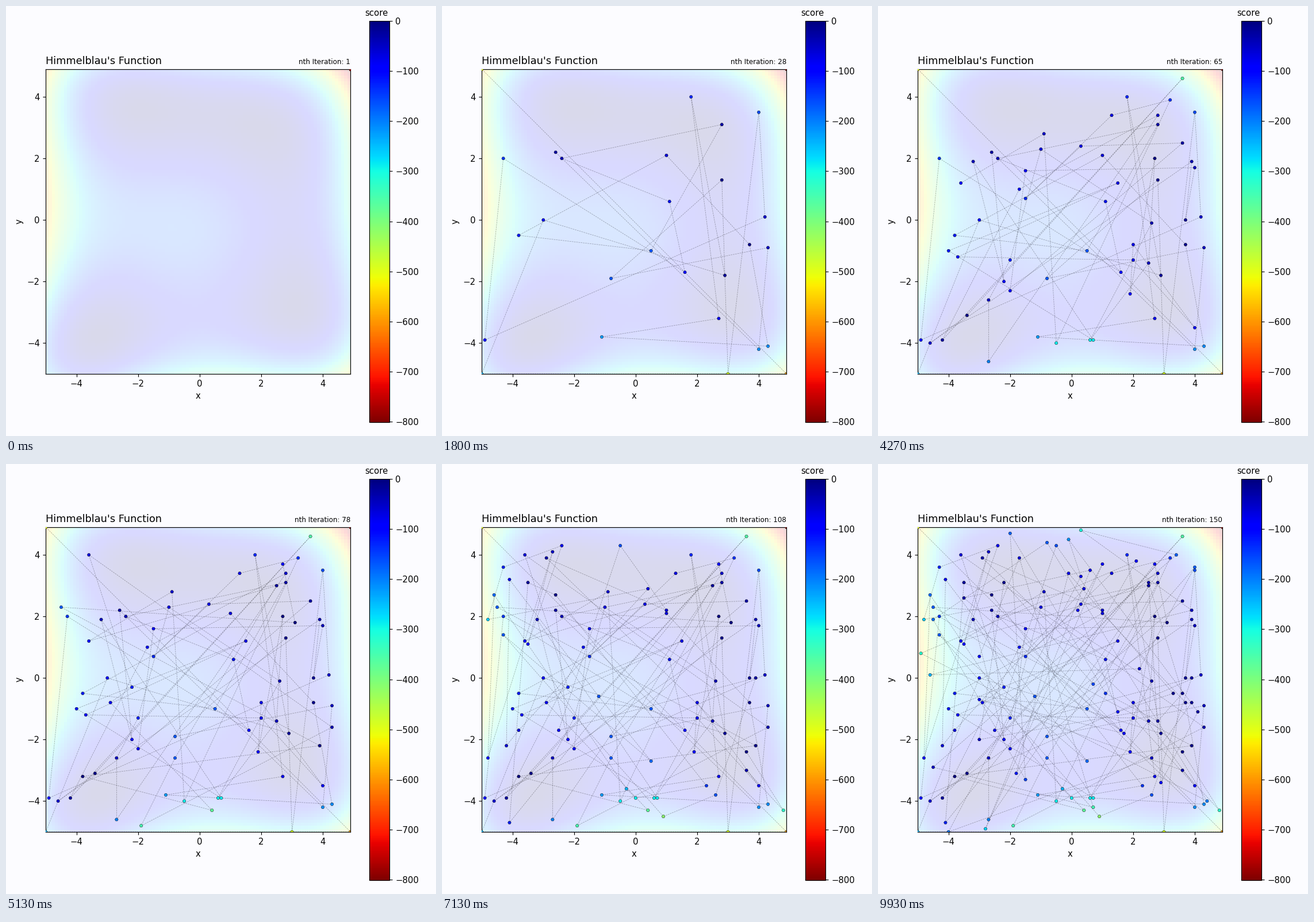
Write a matplotlib script that moves like this. It is 748 px wide and 748 px high and loops after 9990 ms.

```python
import random

import matplotlib.pyplot as plt
import numpy as np
from matplotlib.animation import FuncAnimation
from matplotlib.cm import ScalarMappable
from matplotlib.colors import Normalize

SIZE = 748
LOOP_MS = 9990
STEPS = 150
LOW, HIGH = -5, 4.9
CELLS = 100


def score(x, y):
    """Negative Himmelblau function: the higher, the better."""
    return -((x**2 + y - 11) ** 2 + (x + y**2 - 7) ** 2)


def random_search():
    """Visit the four corners, one fixed start, then random grid cells."""
    rng = random.Random(0)
    cells = []
    while len(cells) < 4:
        corner = tuple((CELLS - 1) * rng.randint(0, 1) for _ in range(2))
        if corner not in cells:
            cells.append(corner)
    cells.append((20, 50))
    while len(cells) < STEPS:
        cells.append((rng.randrange(CELLS), rng.randrange(CELLS)))
    return LOW + 0.1 * np.array(cells)


def add_axes(left, top, right, bottom):
    """Axes from pixel edges measured from the top left of the stage."""
    box = [left, SIZE - bottom, right - left, bottom - top]
    return fig.add_axes([v / SIZE for v in box])


path = random_search()
values = score(path[:, 0], path[:, 1])

axis = LOW + 0.1 * np.arange(CELLS)
grid = score(axis[:, None], axis[None, :])
norm = Normalize(grid.min(), grid.max())

fig = plt.figure(figsize=(7, 7), dpi=SIZE / 7, facecolor="#fcfcff")

ax = add_axes(69.2, 109.9, 599.2, 639.9)
ax.imshow(grid, origin="lower", extent=[LOW, HIGH, LOW, HIGH],
          cmap="jet_r", norm=norm, alpha=0.15, aspect="auto")
trail, = ax.plot([], [], "--", color="black", alpha=0.33, linewidth=0.5)
dots = ax.scatter([], [], c=[], cmap="jet_r", norm=norm, marker="H", s=15,
                  edgecolors="black", linewidth=0.3, zorder=3)
ax.set(xlim=(LOW, HIGH), ylim=(LOW, HIGH), xlabel="x", ylabel="y",
       xticks=range(-4, 5, 2), yticks=range(-4, 5, 2))
ax.set_title("Himmelblau's Function", loc="left", fontsize=12, pad=6)
counter = ax.set_title("", loc="right", fontsize=8, pad=6)

bar_ax = add_axes(632.2, 26.3, 667.1, 723.5)
fig.colorbar(ScalarMappable(norm, "jet_r"), cax=bar_ax,
             ticks=range(-800, 1, 100))
bar_ax.set_title("score", fontsize=10, x=0.352, pad=6)


def draw(step):
    n = step + 1
    trail.set_data(path[:n, 0], path[:n, 1])
    dots.set_offsets(path[:n])
    dots.set_array(values[:n])
    counter.set_text(f"nth Iteration: {n}")
    return trail, dots, counter


anim = FuncAnimation(fig, draw, frames=STEPS, interval=LOOP_MS / STEPS,
                     init_func=lambda: draw(0), repeat=True, repeat_delay=0)
plt.show()
```
